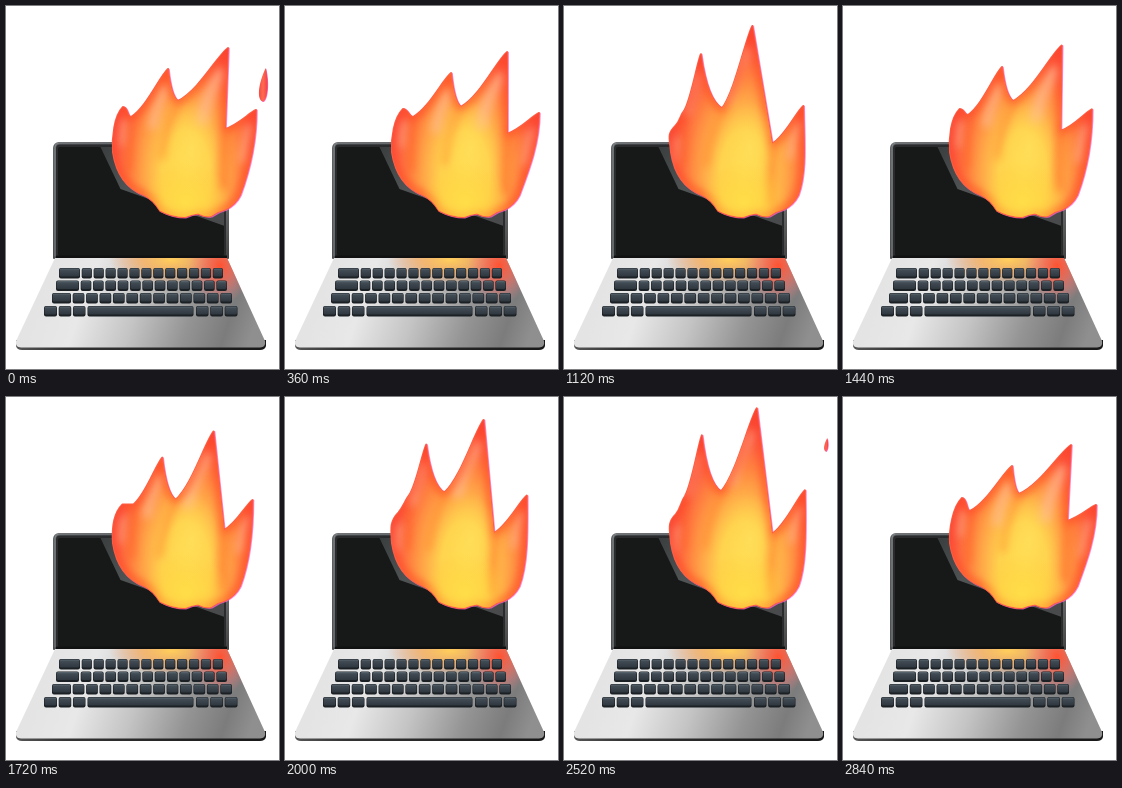
Animation, 273 px wide and 363 px high, one loop 2.88 s. Source, as an HTML page with a canvas:

```html
<!DOCTYPE html>
<html lang="en">
<head>
<meta charset="utf-8">
<title>Burning laptop</title>
<style>
html, body { margin: 0; width: 100%; height: 100%; overflow: hidden; background: #fff; }
canvas { display: block; width: 273px; height: 363px; }
</style>
</head>
<body>
<canvas id="stage"></canvas>
<script>
const W = 273, H = 363, LOOP = 2880, STEP = 40, CYCLE = 12;
const canvas = document.getElementById('stage');
const scale = window.devicePixelRatio || 1;
canvas.width = W * scale;
canvas.height = H * scale;
const ctx = canvas.getContext('2d');

// Flicker poses: phase, then left bump, valley, tip, valley, tall tip, valley, right tip
const poses = [
  [0, 117, 101, 125, 111, 162, 63, 172, 95, 222, 42, 219, 123, 250, 104],
  [2, 114, 115, 125, 98, 142, 50, 160, 96, 200, 26, 209, 136, 242, 100],
  [3, 112, 117, 121, 99, 138, 38, 157, 94, 193, 11, 208, 137, 241, 93],
  [4, 111, 121, 119, 105, 135, 47, 157, 102, 187, 19, 207, 138, 239, 100],
  [6, 115, 111, 127, 105, 149, 56, 165, 104, 197, 26, 215, 137, 241, 100],
  [9, 118, 103, 128, 111, 166, 67, 176, 101, 222, 46, 222, 128, 254, 107],
  [11, 119, 101, 127, 114, 169, 69, 176, 97, 228, 48, 224, 124, 253, 108]
];
const sparkCycles = [0, 3, 5];

const mix = (a, b, k) => a + (b - a) * k;

function poseAt(phase) {
  let i = poses.length - 1;
  while (i > 0 && poses[i][0] > phase) i--;
  const a = poses[i], b = poses[(i + 1) % poses.length];
  const span = (b[0] - a[0] + CYCLE) % CYCLE;
  const k = (phase - a[0]) / span;
  const points = [];
  for (let j = 1; j < a.length; j += 2) {
    points.push([mix(a[j], b[j], k), mix(a[j + 1], b[j + 1], k)]);
  }
  return points;
}

function gradient(x0, y0, x1, y1, stops) {
  const g = ctx.createLinearGradient(x0, y0, x1, y1);
  stops.forEach(([at, color]) => g.addColorStop(at, color));
  return g;
}

function glow(x, y, rx, ry, stops) {
  ctx.save();
  ctx.translate(x, y);
  ctx.scale(rx, ry);
  const g = ctx.createRadialGradient(0, 0, 0, 0, 0, 1);
  stops.forEach(([at, color]) => g.addColorStop(at, color));
  ctx.fillStyle = g;
  ctx.fillRect(-10, -10, 20, 20);
  ctx.restore();
}

function box(x, y, w, h, r) {
  const p = new Path2D();
  p.roundRect(x, y, w, h, r);
  return p;
}

function fill(path, style) {
  ctx.fillStyle = style;
  ctx.fill(path);
}

function drawScreen() {
  fill(box(47, 136, 176, 117, [6, 6, 1, 1]),
    gradient(47, 136, 223, 250, [[0, '#606568'], [.3, '#4b4e50'], [.8, '#77797a'], [1, '#444']]));
  fill(box(50, 138.5, 170, 113, 4), '#292b2c');
  const glass = box(52, 141, 166, 109, 2);
  fill(glass, '#171818');
  ctx.save();
  ctx.clip(glass);
  fill(new Path2D('M94 140 L114.5 183 L219 220 V140Z'),
    gradient(94, 140, 200, 215, [[0, '#3a3d3e'], [.35, '#505354'], [1, '#484a4b']]));
  ctx.restore();
  ctx.strokeStyle = '#8b8e90';
  ctx.lineWidth = .8;
  ctx.stroke(new Path2D('M49 250 V141 Q49 137 53 137 H217 Q222 137 222 142'));
  fill(box(50, 249.5, 171, 2.5, 0), '#111');
}

function drawKey(x, y, w) {
  fill(box(x, y, w, 10.5, 2), '#1b2024');
  fill(box(x + .6, y + .4, w - 1.2, 8, 1.5),
    gradient(0, y, 0, y + 8, [[0, '#626f79'], [.3, '#414b54'], [1, '#303840']]));
}

function drawRow(y, left, first, right, count) {
  drawKey(left, y, first);
  const start = left + first + 1.7, pitch = (right - start + 1.7) / count;
  for (let i = 0; i < count; i++) drawKey(start + i * pitch, y, pitch - 1.7);
}

function drawBase() {
  fill(new Path2D('M10 334 H260 V340 Q259 344 254 344 H16 Q11 344 10 340Z'),
    gradient(10, 0, 260, 0, [[0, '#555'], [.2, '#333'], [1, '#181818']]));
  const deck = new Path2D('M49 252 H221 L259 335 Q260 341.5 254 341.5 H15 Q9 341.5 10 335Z');
  fill(deck, gradient(40, 275, 240, 345,
    [[0, '#e4e4e4'], [.2, '#e8e8e8'], [.45, '#c4c4c4'], [.7, '#949494'], [.88, '#7c7c7c'], [1, '#8f8f8f']]));
  ctx.save();
  ctx.clip(deck);
  glow(165, 254, 62, 24, [[0, 'rgba(255,206,92,1)'], [.45, 'rgba(255,176,85,.75)'], [1, 'rgba(255,150,80,0)']]);
  glow(214, 260, 32, 38, [[0, 'rgba(255,82,48,1)'], [.4, 'rgba(255,100,78,.7)'], [1, 'rgba(255,120,130,0)']]);
  ctx.restore();
  drawRow(262, 53, 21, 217, 12);
  drawRow(274.5, 50, 23, 221, 12);
  drawRow(287, 46, 19, 226, 12);
  drawRow(300, 38, 13, 79.5, 2);
  drawKey(81.5, 300, 106);
  drawRow(300, 190, 12.5, 231.5, 2);
}

function flamePath([bump, v1, t2, v2, t3, v3, t4]) {
  const p = new Path2D();
  // Up a flank: hollow near the valley, full near the tip.
  const rise = (a, b) => p.bezierCurveTo(
    mix(a[0], b[0], .42), mix(a[1], b[1], .2),
    mix(a[0], b[0], .78), mix(a[1], b[1], .85), ...b);
  const fall = (a, b, kx, ky) =>
    p.quadraticCurveTo(mix(a[0], b[0], kx), mix(a[1], b[1], ky), ...b);
  const climb = Math.min(0, v1[1] - bump[1]);
  p.moveTo(107, 146);
  p.bezierCurveTo(106, 132, bump[0] - 9, bump[1] + 9, ...bump);
  p.bezierCurveTo(bump[0] + 5, bump[1] + climb * .35, v1[0] - 4, v1[1] - climb * .3, ...v1);
  rise(v1, t2);
  fall(t2, v2, .3, .85);
  rise(v2, t3);
  fall(t3, v3, .5, .5);
  rise(v3, t4);
  p.bezierCurveTo(t4[0], t4[1] + 30, 243, 165, 234, 189);
  p.quadraticCurveTo(229, 199, 219, 203.5);
  p.quadraticCurveTo(212, 205, 205, 210);
  p.quadraticCurveTo(199, 211, 192, 207.5);
  p.quadraticCurveTo(186, 208, 179, 211);
  p.quadraticCurveTo(166, 211, 154, 204.5);
  p.quadraticCurveTo(147, 193, 138, 189);
  p.quadraticCurveTo(112, 179, 107, 146);
  p.closePath();
  return p;
}

function streak(x, y, dx, dy, width, color) {
  ctx.lineWidth = width;
  ctx.strokeStyle = color;
  ctx.beginPath();
  ctx.moveTo(x, y);
  ctx.quadraticCurveTo(x + dx * .7, y + dy * .4, x + dx, y + dy);
  ctx.stroke();
}

function drawFlame(pose) {
  const path = flamePath(pose);
  ctx.lineJoin = ctx.lineCap = 'round';
  ctx.save();
  ctx.translate(.8, .6);
  ctx.strokeStyle = 'rgba(255,98,215,.75)';
  ctx.lineWidth = 2;
  ctx.stroke(path);
  ctx.restore();
  ctx.strokeStyle = '#ff5d43';
  ctx.lineWidth = 2;
  ctx.stroke(path);

  ctx.save();
  ctx.clip(path);
  glow(180, 168, 80, 142, [
    [0, '#ffe052'], [.3, '#ffd34e'], [.5, '#ffab48'],
    [.7, '#ff8040'], [.9, '#fb5a46'], [1, '#f54c48']
  ]);
  const [bump, v1, t2, v2, t3, v3, t4] = pose;
  const peach = 'rgba(255,190,155,.6)', ember = 'rgba(255,88,32,.5)';
  ctx.filter = `blur(${4 * scale}px)`;
  streak(v1[0], v1[1] + 4, -2, 48, 7, ember);
  streak(v2[0], v2[1] + 4, -16, 52, 6, 'rgba(255,120,40,.5)');
  streak(v3[0], v3[1] + 4, -2, 54, 8, ember);
  streak(bump[0], bump[1] + 14, -2, 22, 6, peach);
  streak(t2[0] - 3, t2[1] + 20, -12, 36, 10, peach);
  streak(t3[0] - 8, t3[1] + 26, -18, 46, 13, peach);
  streak(t4[0] - 5, t4[1] + 18, -8, 32, 7, peach);
  ctx.strokeStyle = 'rgba(255,66,32,.7)';
  ctx.lineWidth = 7;
  ctx.stroke(path);
  ctx.filter = 'none';
  glow(180, 196, 44, 40, [[0, 'rgba(255,222,72,.95)'], [.5, 'rgba(255,214,66,.6)'], [1, 'rgba(255,200,60,0)']]);
  glow(186, 142, 26, 46, [[0, 'rgba(255,224,92,.7)'], [1, 'rgba(255,214,80,0)']]);
  ctx.restore();
}

function drawSpark(age) {
  const k = age / 3;
  const x = mix(257, 262, k), top = mix(62, 41, k), bottom = mix(95.5, 54.5, k);
  const w = mix(4.8, 2.2, k), h = bottom - top;
  const p = new Path2D();
  p.moveTo(x + w * .55, top);
  p.bezierCurveTo(x + w * 1.25, top + h * .4, x + w, bottom - 2, x, bottom);
  p.bezierCurveTo(x - w * 1.3, bottom - 1, x - w * 1.1, top + h * .5, x + w * .55, top);
  ctx.save();
  ctx.translate(.6, .4);
  fill(p, '#ff67cf');
  ctx.restore();
  fill(p, gradient(x - w, 0, x + w, 0, [[0, '#f5443f'], [.5, '#ff6a52'], [1, '#ef3e41']]));
}

function draw(time) {
  const t = Math.floor(time % LOOP / STEP);
  const cycle = Math.floor(t / CYCLE), step = t % CYCLE;
  // A slow drift keeps the six flickers from being identical.
  const drift = .15 * (1 - Math.cos(2 * Math.PI * t * STEP / LOOP));
  ctx.setTransform(scale, 0, 0, scale, 0, 0);
  ctx.fillStyle = '#fff';
  ctx.fillRect(0, 0, W, H);
  drawScreen();
  drawBase();
  drawFlame(poseAt((step + drift) % CYCLE));
  const born = cycle === 0 ? 0 : 1;
  if (sparkCycles.includes(cycle) && step >= born && step < 4) drawSpark(step);
}

const start = performance.now();
function tick() {
  draw(performance.now() - start);
  requestAnimationFrame(tick);
}
tick();
</script>
</body>
</html>
```
